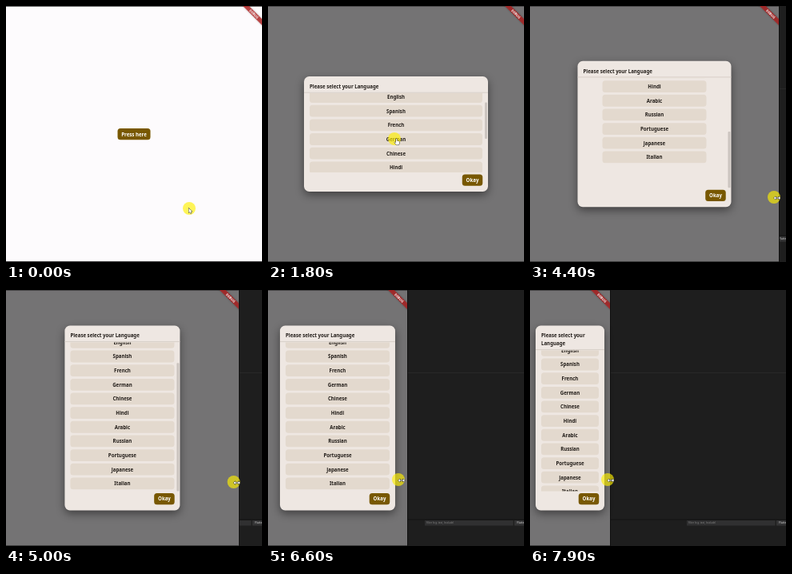
An HTML page with a canvas that plays this animation: 320 by 320 pixels, repeating every 8000 ms.

```html
<!DOCTYPE html>
<html lang="en">
<head>
<meta charset="utf-8">
<title>Responsive language dialog</title>
<style>
  html, body { margin: 0; width: 100%; height: 100%; overflow: hidden; background: #fdfbfd; }
  canvas { display: block; width: 320px; height: 320px; }
</style>
</head>
<body>
<canvas id="stage" width="320" height="320"></canvas>
<script>
const LOOP = 8000, SIZE = 320, ROW = 17.65;
const BROWN = '#785800', INK = '#211c18';
const FONT = '"Noto Sans", "Open Sans", sans-serif';
const LANGUAGES = ['Bangle', 'English', 'Spanish', 'French', 'German', 'Chinese',
  'Hindi', 'Arabic', 'Russian', 'Portuguese', 'Japanese', 'Italian'];

const stage = document.getElementById('stage').getContext('2d');
const layer = document.createElement('canvas');
layer.width = layer.height = SIZE;
const sheet = layer.getContext('2d');

// Keyframes are [time, ...values]
const WINDOW_EDGE = [[3900, 320], [4400, 311], [4800, 302], [5700, 252], [6600, 174], [7500, 119], [7900, 100], [8000, 97]];
const SCROLL = [[1500, 0], [2500, 116.5], [4200, 116.5], [4400, 107.5], [4750, 30]];
const POINTER = [[100, 229, 253], [900, 158, 166], [2450, 158, 166], [2700, 310, 247]];
const RESIZER = [[3350, 328, 237], [3700, 316, 237], [3950, 316, 237], [4400, 305, 239], [4800, 296, 240],
  [5700, 245, 240], [6600, 163, 237], [7500, 114, 237], [7900, 97, 237], [8000, 94, 237]];

const clamp = (v, lo = 0, hi = 1) => Math.min(hi, Math.max(lo, v));
const mix = (a, b, k) => a + (b - a) * k;
const smooth = k => k * k * (3 - 2 * k);

function track(keys, t, ease = k => k) {
  const next = keys.findIndex(key => key[0] > t);
  if (next === 0) return keys[0].slice(1);
  if (next < 0) return keys[keys.length - 1].slice(1);
  const a = keys[next - 1], b = keys[next];
  const k = ease((t - a[0]) / (b[0] - a[0]));
  return a.slice(1).map((v, i) => mix(v, b[i + 1], k));
}

function box(c, x, y, w, h, r, fill) {
  c.fillStyle = fill;
  c.beginPath();
  c.roundRect(x, y, w, h, r);
  c.fill();
}

function label(c, text, x, y, color, size = 6.1, align = 'center', weight = 700) {
  c.font = `${weight} ${size}px ${FONT}`;
  c.textAlign = align;
  c.fillStyle = color;
  c.fillText(text, x, y + size * 0.36);
}

function button(c, text, x, y, w, hover = 0) {
  box(c, x - w / 2, y - 7, w, 14.3, 3.5, BROWN);
  if (hover) box(c, x - w / 2, y - 7, w, 14.3, 3.5, `rgba(255,255,255,${0.1 * hover})`);
  label(c, text, x, y + 0.4, '#fff');
}

function drawEditor(edge) {
  const c = stage;
  c.fillStyle = '#1e1e1e';
  c.fillRect(0, 0, SIZE, SIZE);
  c.fillStyle = '#282828';
  c.fillRect(0, 103, SIZE, 1);
  c.fillStyle = '#181818';
  c.fillRect(0, 286, SIZE, 2);
  box(c, 196, 288, 110.5, 6.5, 0, '#303031');
  box(c, 308, 288, 14, 6.5, 0, '#343435');
  label(c, 'Filter (e.g. text, !exclude)', 198, 291, '#858585', 3, 'left', 400);
  label(c, 'Flutter', 311, 291, '#d0d0d0', 3.6, 'left', 400);
  c.fillStyle = '#111';
  c.fillRect(edge, 0, 1, SIZE);
}

function drawDialog(t, edge) {
  const c = sheet;
  c.clearRect(0, 0, SIZE, SIZE);
  const change = clamp((t - 4180) / 500);
  const width = Math.min(mix(230, 144, change), edge - 14);
  const height = mix(144, 231, change);
  const center = edge / 2, left = center - width / 2, right = left + width;
  const top = 160 - height / 2, bottom = top + height;

  c.save();
  c.shadowColor = 'rgba(0,0,0,.45)';
  c.shadowBlur = 11;
  c.shadowOffsetY = 4;
  box(c, left, top, width, height, 6.5, '#eee7e2');
  c.restore();

  const wrapped = width < 101;
  const lines = wrapped ? ['Please select your', 'Language'] : ['Please select your Language'];
  lines.forEach((line, i) => label(c, line, left + 7, top + 12.6 + i * 9.8, INK, 6.1, 'left'));

  const listTop = top + (wrapped ? 31 : 21), listBottom = bottom - 24;
  const view = listBottom - listTop;
  c.fillStyle = '#d5ccc5';
  c.fillRect(left, listTop - 1.3, width, 0.9);

  const [offset] = track(SCROLL, t, t < 3000 ? smooth : undefined);
  const rowWidth = Math.min(width - 14, change > 0 ? 130 : 216);
  c.save();
  c.beginPath();
  c.rect(left, listTop, width, view);
  c.clip();
  LANGUAGES.forEach((name, i) => {
    const y = listTop + 12.5 - offset + i * ROW;
    box(c, center - rowWidth / 2, y - 7.7, rowWidth, 14.8, 3.5, '#e3d9ce');
    label(c, name, center, y, INK);
  });
  c.restore();

  if ((t > 1500 && t < 3200) || (t > 4180 && t < 5950)) {
    const content = 216, over = Math.max(0, offset - (content - view));
    const thumb = view * view / content - over * 0.6;
    const y = Math.min(listTop + offset / content * view, listBottom - thumb);
    box(c, right - 4, y, 3, thumb, 1, '#cbc4bf');
  }

  const hover = Math.min(clamp((t - 2500) / 80), clamp((2890 - t) / 200));
  button(c, 'Okay', right - 19.5, bottom - 14.6, 25.5, hover);
}

function drawBanner(edge) {
  const c = stage;
  c.save();
  c.beginPath();
  c.rect(0, 0, edge, SIZE);
  c.clip();
  c.translate(edge, 0);
  c.rotate(Math.PI / 4);
  c.shadowColor = 'rgba(0,0,0,.4)';
  c.shadowBlur = 2.5;
  c.fillStyle = 'rgba(183,28,28,.75)';
  c.fillRect(-20, 11.5, 40, 5.4);
  c.shadowColor = 'transparent';
  label(c, 'DEBUG', 0, 14.2, '#fff', 4.2);
  c.restore();
}

function shape(x, y, points, width = 0.8) {
  const c = stage;
  c.beginPath();
  points.forEach(([px, py]) => c.lineTo(x + px, y + py));
  c.closePath();
  c.lineWidth = width;
  c.lineJoin = 'round';
  c.strokeStyle = '#111';
  c.stroke();
  c.fillStyle = '#fff';
  c.fill();
}

const ARROW = [[0, 0], [0, 6], [1.4, 4.8], [2.4, 7], [3.4, 6.5], [2.4, 4.4], [4.2, 4.4]];
const HAND = [[0, 0], [1.1, 0], [1.2, 2.6], [4, 3.3], [4.3, 5], [3.5, 7.6], [0.2, 7.6], [-1.9, 4.5], [-1.2, 4], [0, 5]];
const RESIZE = [[-4.2, 0], [-2, -2], [-2, -0.6], [2, -0.6], [2, -2], [4.2, 0], [2, 2], [2, 0.6], [-2, 0.6], [-2, 2]];

function halo(x, y, alpha) {
  stage.beginPath();
  stage.arc(x, y, 8, 0, Math.PI * 2);
  stage.fillStyle = `rgba(255,240,0,${alpha})`;
  stage.fill();
}

function drawCursor(t) {
  if (t < 2750) {
    const [x, y] = track(POINTER, t, smooth);
    const clicking = t >= 1000 && t < 1250;
    halo(x, y, clicking ? 0.8 : 0.65);
    const onControl = t > 800 && t < 2650;
    if (onControl) shape(x + 2, y, HAND);
    else shape(x - 0.5, y - 0.5, ARROW);
  } else if (t > 3350) {
    const [x, y] = track(RESIZER, t);
    halo(x, y, 0.65);
    shape(x + 4, y + 1, RESIZE, 1);
  }
}

function draw(t) {
  const c = stage;
  const [edge] = track(WINDOW_EDGE, t);
  const opening = clamp((t - 1000) / 150);
  drawEditor(edge);

  c.fillStyle = '#fdfbfd';
  c.fillRect(0, 0, edge, SIZE);
  button(c, 'Press here', edge / 2, 160, Math.min(41, edge));
  if (opening > 0) {
    c.fillStyle = `rgba(0,0,0,${0.54 * opening ** 0.76})`;
    c.fillRect(0, 0, edge, SIZE);
    drawDialog(t, edge);
    c.globalAlpha = opening ** 1.15;
    c.drawImage(layer, 0, 0);
    c.globalAlpha = 1;
  }
  c.fillStyle = '#3c3c3c';
  c.fillRect(0, 0, edge, 0.8);
  c.fillRect(0, 319, edge, 1);
  drawBanner(edge);
  drawCursor(t);
}

const start = performance.now();
function tick() {
  draw((performance.now() - start) % LOOP);
  requestAnimationFrame(tick);
}
tick();
</script>
</body>
</html>
```
